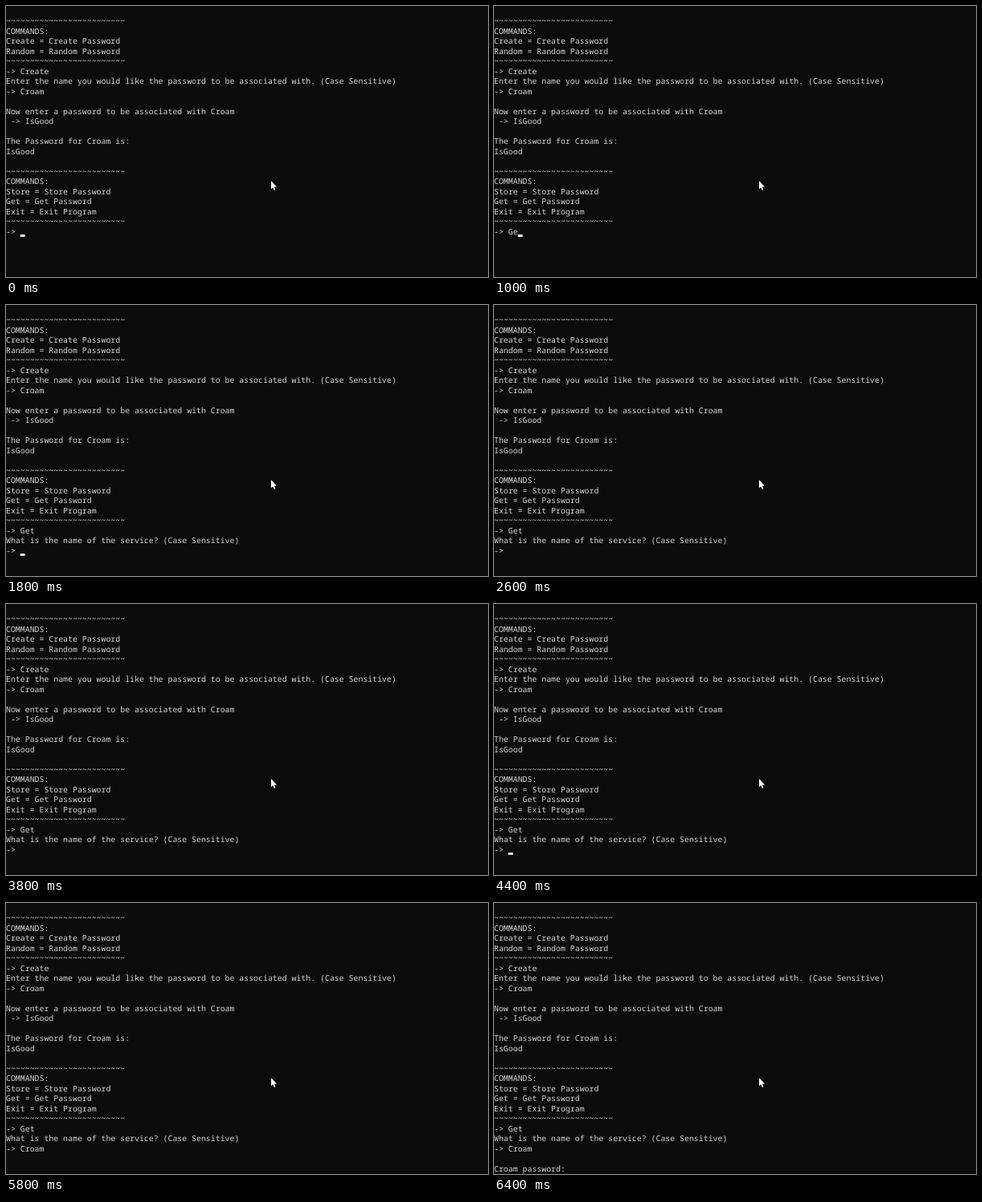
These frames come from a looping animation (600x338 px, 8 s). An HTML page with a canvas:

```html
<!DOCTYPE html>
<html lang="en">
<head>
<meta charset="utf-8">
<title>Password console</title>
<style>
html, body { margin: 0; width: 100%; height: 100%; overflow: hidden; background: #0b0b0b; }
canvas { display: block; width: 600px; height: 338px; }
</style>
</head>
<body>
<canvas id="stage"></canvas>
<script>
const W = 600, H = 338, LOOP = 8000, TICK = 200;
const CHAR = 5.94, ROW = 12.5, BASE = 22.4;
const BLINK = 1060, BLINK_START = 450;
const NAME = "Croam";
const RULE = "~".repeat(25);

const history = `${RULE}
COMMANDS:
Create = Create Password
Random = Random Password
${RULE}
-> Create
Enter the name you would like the password to be associated with. (Case Sensitive)
-> ${NAME}

Now enter a password to be associated with ${NAME}
 -> IsGood

The Password for ${NAME} is:
IsGood

${RULE}
COMMANDS:
Store = Store Password
Get = Get Password
Exit = Exit Program
${RULE}`.split("\n");

// Each prompt opens at a time, then takes one letter per key press.
const prompts = [
  { open: 0, intro: [], word: "Get", keys: [400, 1000, 1200] },
  { open: 1800, intro: ["What is the name of the service? (Case Sensitive)"],
    word: NAME, keys: [4800, 5200, 5400, 5600, 5600] }
];
const ANSWER_AT = 6400;

const canvas = document.getElementById("stage");
const ctx = canvas.getContext("2d", { alpha: false });
const scale = window.devicePixelRatio || 1;
canvas.width = Math.round(W * scale);
canvas.height = Math.round(H * scale);
ctx.scale(scale, scale);

const baseline = row => BASE + row * ROW;

// A key press brings the caret back until the next blink.
function caretVisible(t, lastInput) {
  const phase = (t - BLINK_START + BLINK) % BLINK;
  return phase >= BLINK / 2 || lastInput >= t - phase;
}

function drawCaret(col, row) {
  ctx.fillStyle = "#f2f2f2";
  ctx.fillRect(col * CHAR, baseline(row) + 0.1, CHAR, 2.9);
}

function drawPointer() {
  ctx.fillStyle = "#fff";
  ctx.beginPath();
  [[330, 218], [330, 228.4], [332.3, 226.3], [333.9, 230],
   [335.4, 229.4], [333.9, 225.8], [337, 225.6]]
    .forEach(([x, y]) => ctx.lineTo(x, y));
  ctx.closePath();
  ctx.fill();
}

function draw(time) {
  const t = Math.floor(time / TICK) * TICK;
  const lines = [...history];
  let lastInput = 0;
  for (const { open, intro, word, keys } of prompts) {
    if (t < open) break;
    const pressed = keys.filter(k => k <= t);
    lines.push(...intro, "-> " + word.slice(0, pressed.length));
    lastInput = Math.max(open, ...pressed);
  }
  const answered = t >= ANSWER_AT;
  const caretRow = lines.length - 1;
  const caretCol = lines[caretRow].length;
  if (answered) lines.push("", NAME + " password:");

  ctx.fillStyle = "#0b0b0b";
  ctx.fillRect(0, 0, W, H);
  ctx.fillStyle = "#d6d6d6";
  ctx.font = '500 9.9px "Noto Sans Mono", "DejaVu Sans Mono", monospace';
  ctx.textRendering = "geometricPrecision";
  lines.forEach((text, row) => ctx.fillText(text, 0, baseline(row)));

  if (!answered && caretVisible(t, lastInput)) drawCaret(caretCol, caretRow);
  drawPointer();
}

const start = performance.now();
function tick() {
  draw((performance.now() - start) % LOOP);
  requestAnimationFrame(tick);
}
tick();
</script>
</body>
</html>
```
